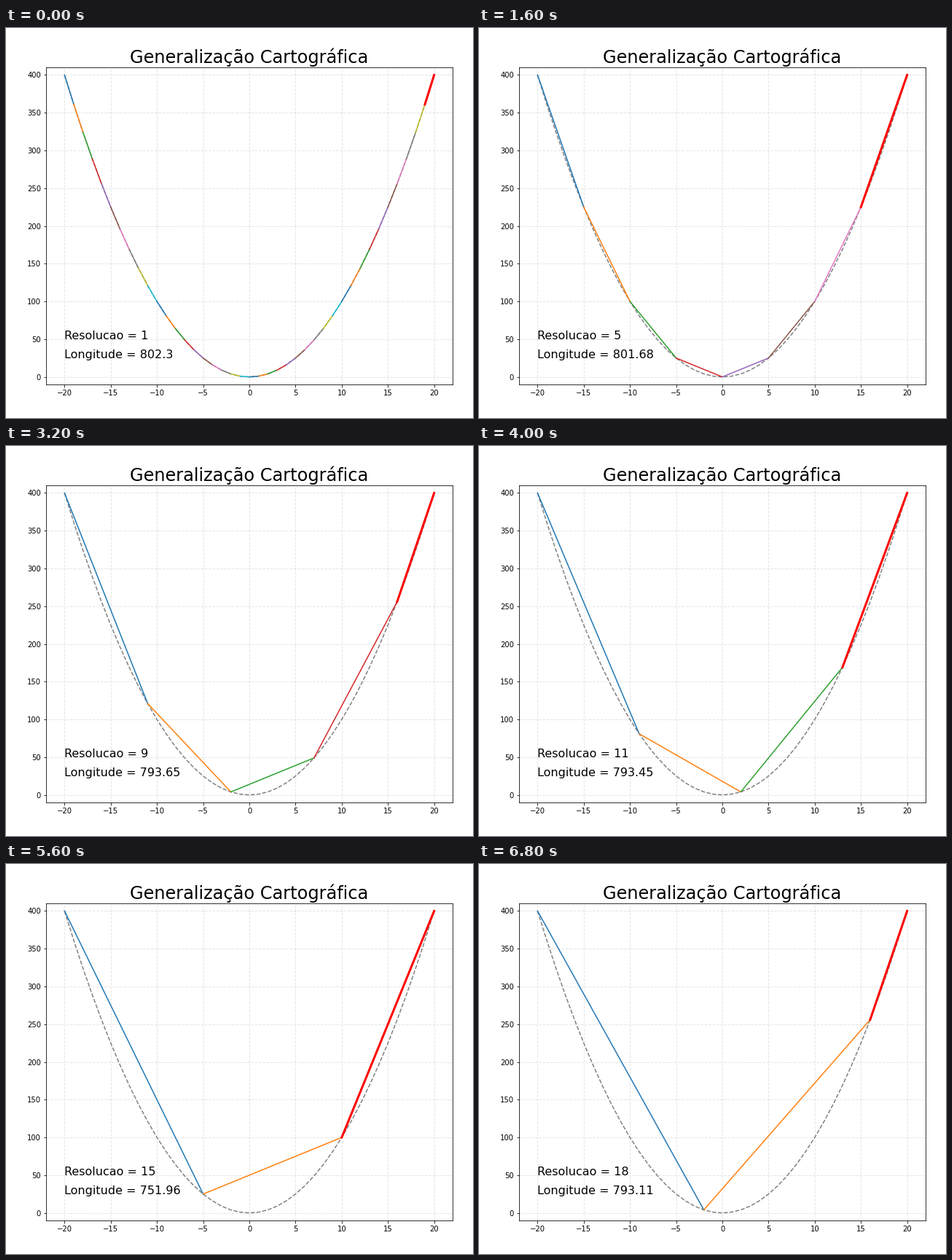
These frames come from a looping animation (641 by 535 pixels, 7.2 s). A matplotlib script:

```python
import math

import matplotlib.pyplot as plt
from matplotlib.animation import FuncAnimation

W, H, DPI = 641, 535, 72
FRAMES, INTERVAL = 18, 400
X_MIN, X_MAX = -20, 20

plt.rcParams["font.family"] = "DejaVu Sans"


def parabola(x):
    return x * x


def segments(step):
    """Chords of the parabola every `step` units, the last one cut at X_MAX."""
    xs = list(range(X_MIN, X_MAX, step)) + [X_MAX]
    return list(zip(xs, xs[1:]))


def chord_length(a, b):
    return round(math.hypot(b - a, parabola(b) - parabola(a)), 2)


fig = plt.figure(figsize=(W / DPI, H / DPI), dpi=DPI, facecolor="white")
ax = fig.add_axes([55 / W, 46 / H, 558 / W, 434.88 / H])


def draw(i):
    step = i + 1
    chords = segments(step)

    ax.clear()
    ax.set_title("Generalização Cartográfica", fontsize=24)
    ax.grid(True, linestyle="--", color="gray", alpha=0.2, linewidth=1)

    xs = range(X_MIN, X_MAX + 1)
    ax.plot(xs, [parabola(x) for x in xs], "--", color="gray", linewidth=1.5)

    for k, (a, b) in enumerate(chords):
        last = k == len(chords) - 1
        ax.plot([a, b], [parabola(a), parabola(b)],
                color="red" if last else f"C{k % 10}",
                linewidth=3 if last else 1.5)

    total = round(sum(chord_length(a, b) for a, b in chords), 2)
    ax.text(X_MIN, 50, f"Resolucao = {step}", fontsize=16)
    ax.text(X_MIN, 25, f"Longitude = {total}", fontsize=16)

    ax.set_xlim(-22, 22)
    ax.set_ylim(-10, 410)
    ax.set_xticks(range(-20, 21, 5))
    ax.set_yticks(range(0, 401, 50))
    return []


anim = FuncAnimation(fig, draw, frames=FRAMES, init_func=lambda: [],
                     interval=INTERVAL, repeat=True, repeat_delay=0)
plt.show()
```
